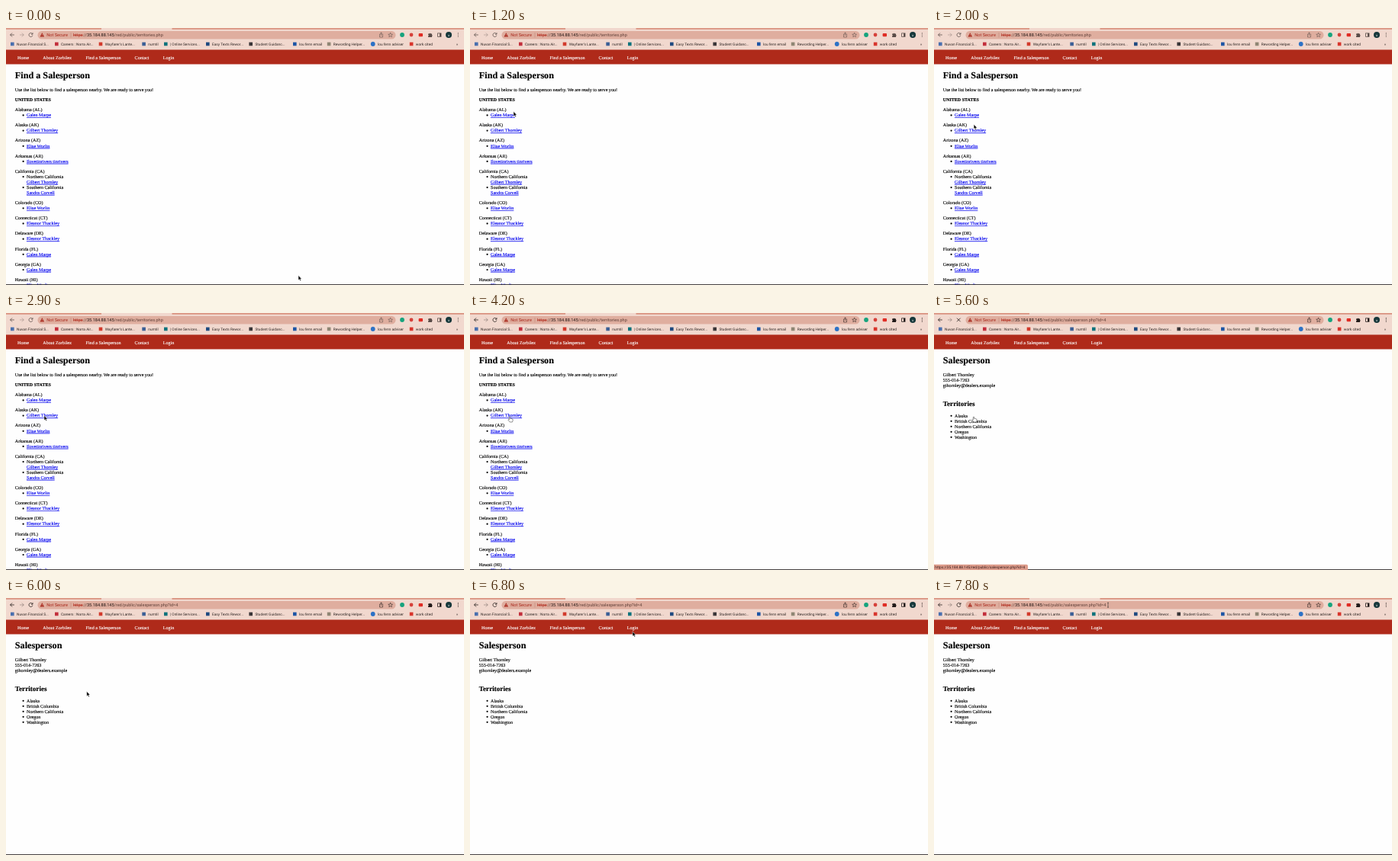
An HTML page that plays this animation: 600x337 px, repeating every 8 s.

```html
<!DOCTYPE html>
<html lang="en">
<head>
<meta charset="utf-8">
<title>Find a Salesperson</title>
<style>
  html, body { margin: 0; width: 100%; height: 100%; overflow: hidden; background: #fefefe; }
  svg { display: block; width: 100vw; height: 100vh; }
  text { font-family: "Liberation Serif", serif; font-size: 6.1px; text-rendering: geometricPrecision; white-space: pre; }
  .ui { font-family: Roboto, sans-serif; }
  .page text { stroke: #000; stroke-width: .14px; }
  .page .link { fill: #0000ee; stroke: #0000ee; text-decoration: underline; }
  #nav text { stroke: #fff; stroke-width: .14px; }
  .line { fill: none; stroke: currentColor; stroke-width: .8; }
</style>
</head>
<body>
<svg id="stage" viewBox="0 0 600 337" xmlns="http://www.w3.org/2000/svg">
  <rect width="600" height="337" fill="#fefefe"/>
  <g id="list" class="page" transform="translate(0 -.35)"></g>
  <g id="person" class="page" transform="translate(0 -.35)"></g>

  <rect width="600" height="29" fill="#f1d8ce"/>
  <path d="M0 0H125V2H0ZM217.5 0H600V2H217.5Z" fill="#dd9c8a"/>
  <rect x="41.5" y="4" width="469" height="10.4" rx="5.2" fill="#dfae9f"/>

  <g id="tools">
    <path class="line" d="M10.8 9H5.6M8 6.5L5.5 9L8 11.5"/>
    <path class="line" d="M18 9H23.2M20.8 6.5L23.3 9L20.8 11.5" opacity=".4"/>
    <path id="reload" class="line" d="M34.6 7.7A2.5 2.5 0 1 0 34.9 9.7M35 6.2V8.2H33"/>
    <path id="stop" class="line" d="M30 6.7L34.6 11.3M34.6 6.7L30 11.3"/>
    <path class="line" style="stroke-width:.55" d="M490.6 8H489.5V12H493.5V8H492.4M491.5 10V6M490.2 7.2L491.5 5.9L492.8 7.2"/>
    <path class="line" style="stroke-width:.55" d="M503.6 6.2L504.4 8.2L506.5 8.3L504.9 9.7L505.4 11.7L503.6 10.6L501.8 11.7L502.3 9.7L500.7 8.3L502.8 8.2Z"/>
    <path fill="currentColor" d="M553 7.4H554.6A1 1 0 0 1 556.5 7.4H558V9A1 1 0 0 1 558 10.8V12H553V10.7A1 1 0 0 0 553 8.8Z"/>
    <path fill="currentColor" fill-rule="evenodd" d="M565.2 6.5H570.4V11.7H565.2ZM566 7.3V10.9H568V7.3Z"/>
    <g fill="currentColor"><circle cx="592.3" cy="6.9" r=".6"/><circle cx="592.3" cy="9" r=".6"/><circle cx="592.3" cy="11.1" r=".6"/></g>
  </g>
  <g id="marks" fill="#2b2220"></g>
  <circle cx="519" cy="9" r="2.9" fill="#16a37d"/>
  <circle cx="531" cy="9" r="2.4" fill="#d6403a"/>
  <rect x="540.6" y="6.9" width="5.4" height="4.3" rx="1" fill="#e02c24"/>
  <circle cx="580" cy="9" r="4" fill="#17383b"/>
  <text class="ui" x="580" y="10.5" fill="#dfe8e6" text-anchor="middle" style="font-size:4.2px">a</text>

  <path d="M47.3 6.3L50 11.4H44.6Z" fill="#a8281c"/>
  <path d="M47.3 8V9.7M47.3 10.2V10.8" stroke="#f1d0c6" stroke-width=".5"/>
  <text class="ui" x="53.2" y="11.1" fill="#a8281c" style="font-size:5.65px">Not Secure</text>
  <path d="M85 6V12.4" stroke="#b98274" stroke-width=".5"/>
  <text class="ui" x="88" y="11.1" fill="#5f4039" style="font-size:5.55px"><tspan fill="#b02a1c" text-decoration="line-through">https</tspan>://<tspan fill="#1d1210">35.184.88.145</tspan><tspan id="path"></tspan></text>

  <rect y="28.5" width="600" height="19" fill="#af2a1a"/>
  <g id="nav" fill="#fff"></g>
  <rect y="336" width="600" height="1" fill="#454141"/>

  <g id="status">
    <path d="M0 329.8H121A2 2 0 0 1 123 331.8V337H0Z" fill="#dd9c8b"/>
    <text class="ui" x="1.3" y="335.2" fill="#32191a" style="font-size:4.77px">https://35.184.88.145/red/public/salesperson.php?id=4</text>
  </g>

  <g id="cursor">
    <path id="arrow" d="M0 0V6.1L1.4 4.9L2.4 7.1L3.5 6.6L2.5 4.5H4.3Z" fill="#000" stroke="#fff" stroke-width=".45"/>
    <path id="hand" d="M-.7 .5Q0 -.4 .7 .5V2.5Q1.5 2 2 2.7Q2.8 2.3 3.2 3Q4.2 2.8 4.2 3.8Q4.2 5.6 3.4 7H.2Q-.9 5.8 -2 4.2Q-1.8 3.2 -.7 4Z" fill="#fff" stroke="#222" stroke-width=".5"/>
    <path id="beam" d="M-1 -3.2Q0 -3.2 0 -2.4V2.4Q0 3.2 -1 3.2M1 -3.2Q0 -3.2 0 -2.4M0 2.4Q0 3.2 1 3.2" fill="none" stroke="#222" stroke-width=".55"/>
  </g>
</svg>
<script>
const $ = id => document.getElementById(id);
const LOOP = 8000;

function add(parent, tag, attrs, str) {
  const el = document.createElementNS("http://www.w3.org/2000/svg", tag);
  for (const k in attrs) el.setAttribute(k, attrs[k]);
  if (str) el.textContent = str;
  return $(parent).appendChild(el);
}
const write = (parent, x, y, str, attrs) => add(parent, "text", { x, y, ...attrs }, str);
const bold = px => ({ style: `font-weight:bold;font-size:${px}px` });
const bullet = (parent, y) => add(parent, "circle", { cx: 22.6, cy: y - 1.8, r: 1.1 });
const link = (y, str) => write("list", 27, y, str, { class: "link" });

// Navigation and bookmarks
[[15, "Home"], [48.3, "About Zorbilex"], [104.5, "Find a Salesperson"], [168.6, "Contact"], [205.8, "Login"]]
  .forEach(([x, str]) => write("nav", x, 40.5, str));

[[14, "Nuvan Financial S...", "#4a6fae"], [72, "Careers : Norra Air...", "#c22f3c"],
 [129.7, "Wayfarer's Lante...", "#d23a2c"], [186.3, "numtil", "#3b5f96"],
 [215, "| Online Services...", "#10737c"], [270, "Easy Texts Rewor...", "#1f4a80"],
 [326.4, "Student Guidanc...", "#3a3638"], [384, "lou fenn email", "#1d55a5"],
 [428.8, "Rewording Helper...", "#8f8674"], [487, "lou fenn adviser", "#2c72c6"],
 [536.8, "work cited", "#d8352c"]].forEach(([x, str, fill], i) => {
  if (i === 9) add("marks", "circle", { cx: x - 6.3, cy: 21, r: 2.9, fill });
  else add("marks", "rect", { x: x - 8, y: 18.7, width: 4.6, height: 4.6, fill });
  write("marks", x, 22.8, str, { class: "ui", style: "font-size:4.8px" });
});
write("marks", 589.8, 22.7, "»", { class: "ui", style: "font-size:5px" });

// Territory list
const AL = "Galen Marpe", AK = "Gilbert Thornley", AZ = "Elise Worlin", CT = "Eleanor Thackley";
write("list", 11.8, 66.5, "Find a Salesperson", bold(12.2));
write("list", 11.8, 83.5, "Use the list below to find a salesperson nearby. We are ready to serve you!");
write("list", 11.8, 96.6, "UNITED STATES", bold(6));
let y = 109.5;
[["Alabama (AL)", AL], ["Alaska (AK)", AK], ["Arizona (AZ)", AZ],
 ["Arkansas (AR)", "Ilovetinrivers tinrivers"], ["California (CA)"],
 ["Colorado (CO)", AZ], ["Connecticut (CT)", CT], ["Delaware (DE)", CT],
 ["Florida (FL)", AL], ["Georgia (GA)", AL], ["Hawaii (HI)", AZ]].forEach(([state, name]) => {
  write("list", 11.8, y, state);
  if (name) {
    bullet("list", y + 7.1);
    link(y + 7.1, name);
  } else {
    [["Northern California", AK], ["Southern California", "Sandra Corvell"]].forEach(([area, who]) => {
      bullet("list", y + 7);
      write("list", 27, y + 7, area);
      link(y + 14, who);
      y += 14;
    });
    y -= 7;
  }
  y += 20.17;
});

// Salesperson page
write("person", 11.8, 66.5, "Salesperson", bold(12.2));
[AK, "555-014-7263", "gthornley@dealers.example"].forEach((s, i) => write("person", 11.8, 83.5 + 7 * i, s));
write("person", 11.8, 122, "Territories", bold(9.15));
["Alaska", "British Columbia", "Northern California", "Oregon", "Washington"].forEach((s, i) => {
  bullet("person", 137 + 7 * i);
  write("person", 27, 137 + 7 * i, s);
});

// Pointer path: time, x, y
const track = [
  [0, 383, 324.5], [200, 380, 321], [300, 380, 321], [750, 215, 212], [1200, 57, 109.5],
  [2100, 52, 127], [2500, 50, 134.5], [3100, 50, 134.5], [3300, 52, 136], [5600, 52, 136],
  [6100, 112, 121], [6800, 213, 44], [7100, 217, 33], [7500, 228, 9.2], [LOOP, 228, 9.2]
];
function pointer(t) {
  const i = track.findIndex(k => k[0] > t);
  const [t0, x0, y0] = track[i - 1], [t1, x1, y1] = track[i];
  const k = (t - t0) / (t1 - t0);
  const e = k * k * (3 - 2 * k);
  return [x0 + (x1 - x0) * e, y0 + (y1 - y0) * e];
}

const show = (id, on) => $(id).setAttribute("display", on ? "inline" : "none");

function render(ms) {
  const t = Math.floor(ms / 100) * 100;
  const moved = t >= 5500;
  show("list", !moved);
  show("person", moved);
  $("path").textContent = "/red/public/" + (moved ? "salesperson.php?id=4" : "territories.php");

  const busy = t >= 4900 && t < 6000;
  show("stop", busy);
  show("reload", !busy);
  $("tools").setAttribute("color", t < 3000 ? "#594c48" : "#211a19");

  const fade = t < 5700 ? (t - 4200) / 300 : (5900 - t) / 300;
  $("status").setAttribute("opacity", Math.max(0, Math.min(1, fade)));

  const [x, py] = pointer(t);
  const hand = (t >= 3200 && t < 5700) || (t >= 6900 && t < 7200);
  const beam = t >= 7400;
  $("cursor").setAttribute("transform", `translate(${x.toFixed(2)} ${py.toFixed(2)})`);
  show("hand", hand);
  show("beam", beam);
  show("arrow", !hand && !beam);
}

const start = performance.now();
function tick() {
  render((performance.now() - start) % LOOP);
  requestAnimationFrame(tick);
}
render(0);
requestAnimationFrame(tick);
</script>
</body>
</html>
```
